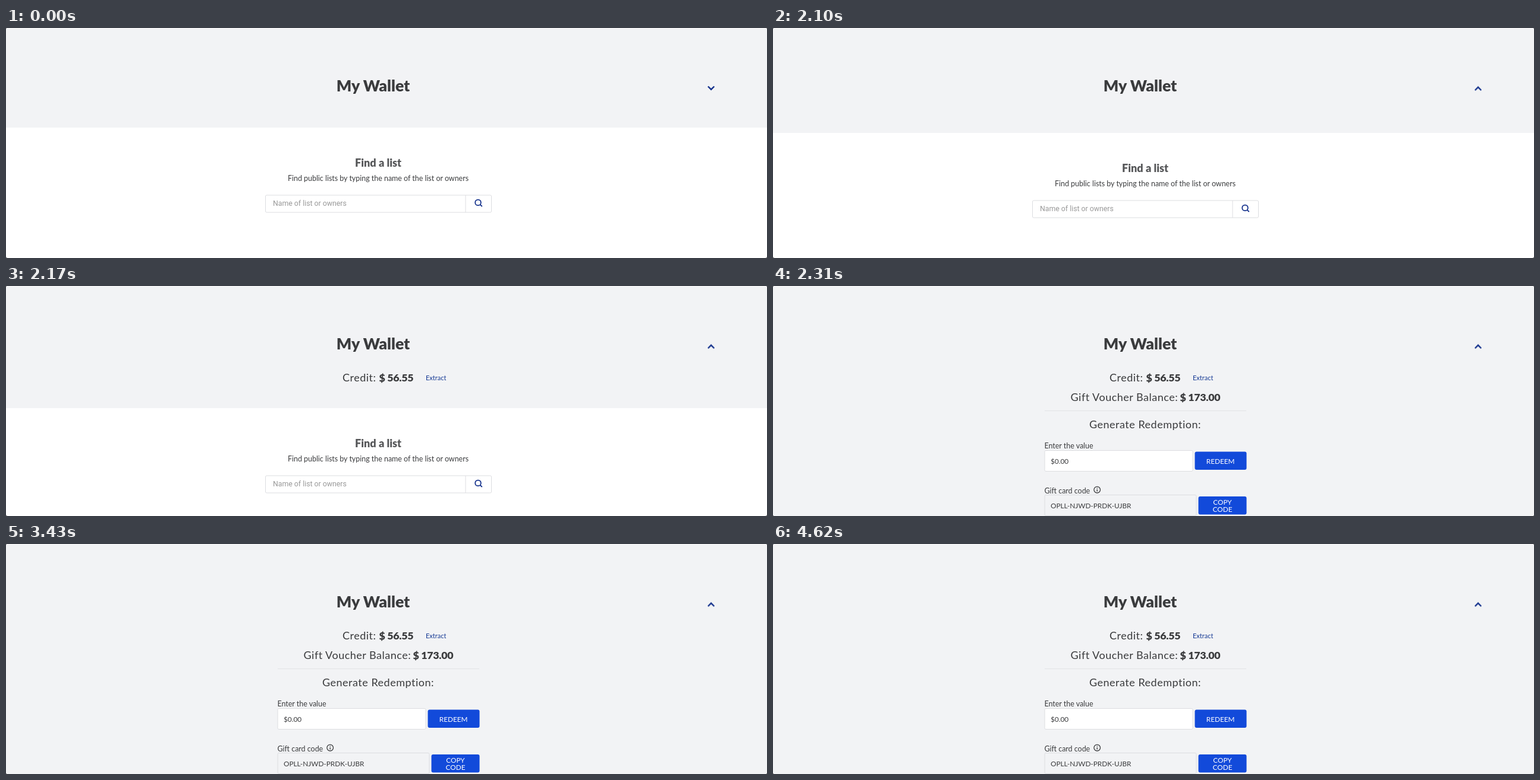
An HTML page that plays this animation: 1280 by 388 pixels, repeating every 5390 ms.

```html
<!DOCTYPE html>
<html lang="en">
<head>
<meta charset="utf-8">
<title>My Wallet</title>
<style>
  html, body { margin: 0; width: 100%; height: 100%; overflow: hidden; background: #555; }
  .stage {
    position: relative; width: 1280px; height: 388px; overflow: hidden;
    border-radius: 3px; background: #fff;
  }
  .panel {
    position: relative; height: 168px; overflow: hidden; background: #f2f3f5;
    box-shadow: inset 0 1px #fafafb;
    animation: open 5390ms step-end infinite;
  }
  .detail { position: absolute; inset: 0 0 40px; overflow: hidden; }
  svg { display: block; position: absolute; left: 0; top: 0; }
  .find { position: relative; }
  text { font: 12.45px Lato, sans-serif; fill: #3a3b3d; white-space: pre; }
  .mid { text-anchor: middle; }
  .title { font-size: 26.6px; font-weight: 900; }
  .sub { font-size: 18.1px; font-weight: 900; fill: #565759; }
  .row { font-size: 18px; letter-spacing: .5px; }
  .sum { font-size: 17.8px; font-weight: 900; letter-spacing: -.3px; }
  .hint { font: 12.3px Roboto, sans-serif; fill: #999; }
  .link { font-size: 11px; fill: #163a94; }
  .value { font-size: 11.8px; }
  .label { font-size: 11.8px; fill: #fff; text-anchor: middle; }
  .box { fill: #fff; stroke: #dcdde0; }
  .locked { fill: #f2f3f5; }
  .btn { fill: #124ada; }
  .icon { fill: none; stroke: #14318c; stroke-width: 1.8; }
  .arrow {
    stroke-width: 2.4; transform-origin: 0 101.8px;
    animation: flip 5390ms step-end infinite;
  }
  @keyframes open {
    0% { height: 168px; }
    38.961% { height: 177px; }
    40.26% { height: 206px; }
    41.558% { height: 371px; }
    42.857%, 100% { height: 440px; }
  }
  @keyframes flip {
    0% { transform: none; }
    38.961%, 100% { transform: scaleY(-1); }
  }
</style>
</head>
<body>
<div class="stage">
  <div class="panel">
    <svg width="1280" height="388">
      <text class="title mid" x="617.5" y="106.5">My Wallet</text>
      <path class="icon arrow" d="M1180.8 98.5l5.2 5.2 5.2-5.2"/>
    </svg>
    <div class="detail">
      <svg width="1280" height="388">
        <text class="row" x="566" y="160.5">Credit:</text>
        <text class="sum" x="627.5" y="160.5">$ 56.55</text>
        <text class="link" x="706" y="159">Extract</text>
        <text class="row" x="500.5" y="193.5">Gift Voucher Balance:</text>
        <text class="sum" x="684.5" y="193.5">$ 173.00</text>
        <path d="M457 210.5H796" stroke="#e2e3e6"/>
        <text class="row mid" x="626" y="240">Generate Redemption:</text>

        <text x="456.5" y="273.5">Enter the value</text>
        <rect class="box" x="457" y="277.5" width="249" height="35" rx="2"/>
        <text class="value" x="467" y="299.5">$0.00</text>
        <rect class="btn" x="709.5" y="279.5" width="87" height="30.5" rx="3"/>
        <text class="label" x="752.7" y="299.5">REDEEM</text>

        <text x="456.5" y="349.5">Gift card code</text>
        <g fill="none" stroke="#3a3b3d" stroke-width="1.3">
          <circle cx="545.2" cy="343.7" r="5.3"/>
          <path d="M545.2 340.3v1.4M545.2 342.9v3.9"/>
        </g>
        <rect class="box locked" x="457" y="352.5" width="255" height="35" rx="2"/>
        <text class="value" x="467" y="375">OPLL-NJWD-PRDK-UJBR</text>
        <rect class="btn" x="715.5" y="355" width="81" height="30.5" rx="3"/>
        <text class="label" x="756" y="369">COPY</text>
        <text class="label" x="756" y="381">CODE</text>
      </svg>
    </div>
  </div>
  <div class="find">
    <svg width="1280" height="220">
      <text class="sub mid" x="626" y="66">Find a list</text>
      <text class="mid" x="626" y="90">Find public lists by typing the name of the list or owners</text>
      <rect class="box" x="436.5" y="114" width="380" height="29" rx="2"/>
      <path d="M773 114v29" stroke="#dcdde0"/>
      <text class="hint" x="449" y="132.3">Name of list or owners</text>
      <g class="icon">
        <circle cx="794" cy="126.4" r="4.8"/>
        <path d="M797.4 129.8l3.4 3.2"/>
      </g>
    </svg>
  </div>
</div>
</body>
</html>
```
